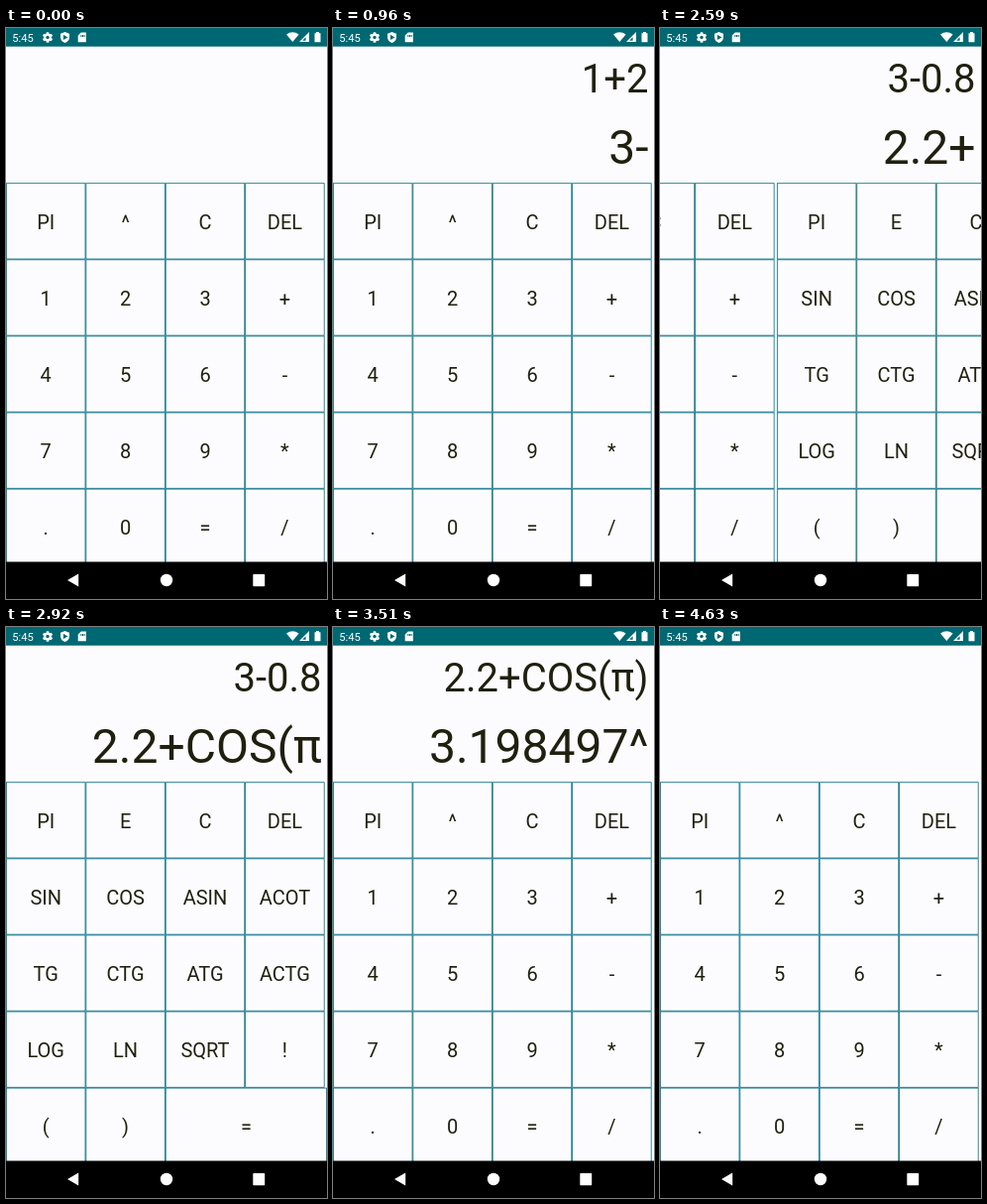
Recreate the animation shown at these times as an HTML page with a canvas. Size 324 px wide and 576 px high, loop 4670 ms.

```html
<!DOCTYPE html>
<html lang="en">
<head>
<meta charset="utf-8">
<title>Calculator</title>
<style>
  html, body { margin: 0; width: 100%; height: 100%; overflow: hidden; background: #fcfcff; }
  canvas { display: block; width: 324px; height: 576px; }
</style>
</head>
<body>
<canvas id="stage"></canvas>
<script>
const W = 324, H = 576, LOOP = 4670;
const BAR = '#006872', LINE = '#006c80', INK = '#20200e', PAPER = '#fcfcff';
const PAD_TOP = 156.3, NAV_TOP = 538.5, COL = 80.4, ROW = 77.1;

const canvas = document.getElementById('stage');
const ctx = canvas.getContext('2d');
const dpr = window.devicePixelRatio || 1;
canvas.width = W * dpr;
canvas.height = H * dpr;

const BASIC = ['PI ^ C DEL', '1 2 3 +', '4 5 6 -', '7 8 9 *', '. 0 = /'];
const SCIENCE = ['PI E C DEL', 'SIN COS ASIN ACOT', 'TG CTG ATG ACTG', 'LOG LN SQRT !', '( ) ='];

// [time, entry, previous expression]
const STEPS = [
  [0, '', ''],
  [200, '1', ''], [390, '1+', ''], [590, '1+2', ''],
  [760, '3', '1+2'], [930, '3-', '1+2'], [1200, '3-0', '1+2'],
  [1450, '3-0.', '1+2'], [1670, '3-0.8', '1+2'],
  [2170, '2.2', '3-0.8'], [2360, '2.2+', '3-0.8'],
  [2710, '2.2+COS(', '3-0.8'], [2880, '2.2+COS(π', '3-0.8'], [3050, '2.2+COS(π)', '3-0.8'],
  [3200, '3.198497', '2.2+COS(π)'], [3490, '3.198497^', '2.2+COS(π)'],
  [3800, '3.198497^2', '2.2+COS(π)'], [4050, '10.23038', '3.198497^2'],
  [4400, '', '']
];

function ease(t, from, to) {
  const p = Math.min(1, Math.max(0, (t - from) / (to - from)));
  return p * p * (3 - 2 * p);
}

function text(str, x, y, size, align, color = INK) {
  ctx.font = `${size}px Roboto, sans-serif`;
  ctx.textAlign = align;
  ctx.fillStyle = color;
  ctx.fillText(str, x, y);
}

function shape(d, color = '#fff') {
  ctx.fillStyle = color;
  ctx.fill(new Path2D(d), 'evenodd');
}

function disc(x, y, r, color = '#fff') {
  ctx.fillStyle = color;
  ctx.beginPath();
  ctx.arc(x, y, r, 0, Math.PI * 2);
  ctx.fill();
}

function keypad(rows, left) {
  ctx.strokeStyle = LINE;
  ctx.lineWidth = 0.8;
  rows.forEach((row, r) => row.split(' ').forEach((label, c, keys) => {
    const x = left + c * COL, y = PAD_TOP + r * ROW;
    const w = keys.length === 3 && c === 2 ? W - c * COL : COL;
    ctx.strokeRect(x + 0.4, y + 0.4, w - 0.8, ROW - 0.8);
    text(label, x + w / 2, y + 46.3, 20, 'center');
  }));
}

function statusBar() {
  ctx.fillStyle = BAR;
  ctx.fillRect(0, 0, W, 18.7);
  text('5:45', 6.3, 13.6, 11.2, 'left', '#fff');

  // Gear
  ctx.fillStyle = '#fff';
  for (let i = 0; i < 3; i++) {
    ctx.save();
    ctx.translate(42, 9.5);
    ctx.rotate(i * Math.PI / 3);
    ctx.fillRect(-1.3, -5.2, 2.6, 10.4);
    ctx.restore();
  }
  disc(42, 9.5, 3.9);
  disc(42, 9.5, 1.7, BAR);

  // Shield and memory card
  shape('M59.5 4L64 5.8V9.2Q64 13.2 59.5 15Q55 13.2 55 9.2V5.8Z');
  shape('M57.9 6.8L62.4 9.4L57.9 12Z', BAR);
  shape('M75.8 4.5H80.8V14.3H72.7V7.6ZM75.4 7H76.4V9H75.4ZM77 7H78V9H77ZM78.6 7H79.6V9H78.6Z');

  // Wi-Fi, signal, battery
  shape('M289.3 14L283 6.6Q289.3 1.8 295.6 6.6Z');
  shape('M296 14L306 4V14ZM299.2 12.8H302.6V9.2Z');
  shape('M311.5 5.2H313V4H316V5.2H317.5V14.3H311.5Z');
}

function navBar() {
  ctx.fillStyle = '#000';
  ctx.fillRect(0, NAV_TOP, W, H - NAV_TOP);
  shape('M62 557L73.2 550.5V563.5Z');
  disc(162, 557, 6.2);
  shape('M250 551H260.5Q261.2 551 261.2 551.7V562.5Q261.2 563.2 260.5 563.2H250Q249.3 563.2 249.3 562.5V551.7Q249.3 551 250 551Z');
}

function draw(t) {
  const [, entry, previous] = STEPS.findLast(step => step[0] <= t);
  const page = ease(t, 2520, 2640) - ease(t, 3290, 3410);

  ctx.setTransform(dpr, 0, 0, dpr, 0, 0);
  ctx.fillStyle = PAPER;
  ctx.fillRect(0, 0, W, H);
  text(previous, 318.5, 64.5, 40, 'right');
  text(entry, 318.5, 137, 48, 'right');
  if (page < 1) keypad(BASIC, -page * W);
  if (page > 0) keypad(SCIENCE, (1 - page) * W);
  statusBar();
  navBar();
}

function tick() {
  draw(performance.now() % LOOP);
  requestAnimationFrame(tick);
}
tick();
</script>
</body>
</html>
```
